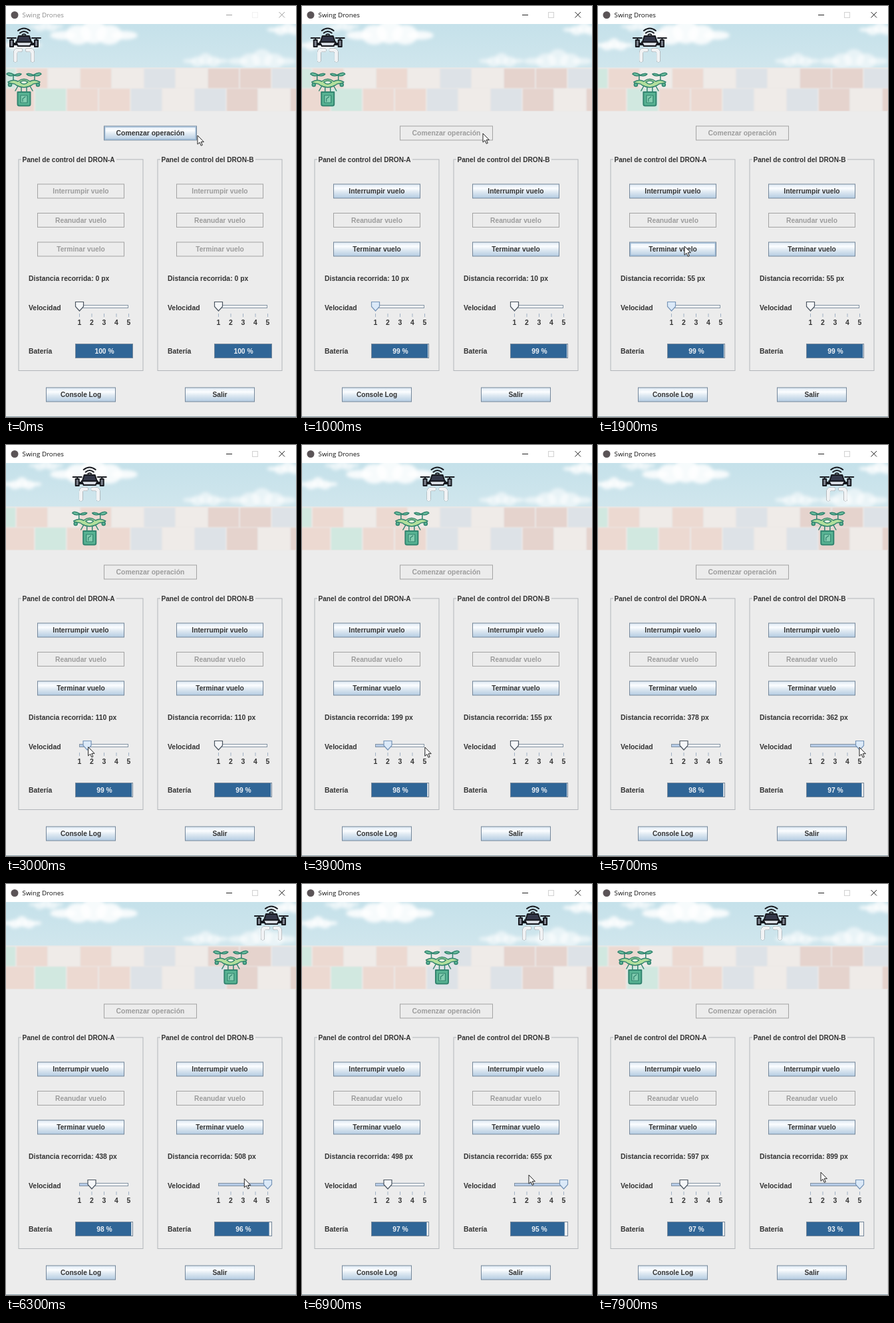
An HTML page for the animation above (8000 ms loop, 436 by 616 pixels).

```html
<!DOCTYPE html>
<html lang="es">
<head>
<meta charset="utf-8">
<title>Swing Drones</title>
<style>
  html, body { margin: 0; width: 100%; height: 100%; overflow: hidden; background: #ececec; }
  svg { display: block; width: 436px; height: 616px; }
  text { font-family: "Liberation Sans", Arial, sans-serif; font-weight: bold; font-size: 10.25px; fill: #333; white-space: pre; }
  .mid { text-anchor: middle; }
  .title { font-family: "Open Sans", "Noto Sans", sans-serif; font-weight: 400; font-size: 9.8px; }
  .face { fill: url(#metal); stroke: #75879a; }
  .glow { fill: none; stroke: #9dbad5; stroke-width: 1.4; visibility: hidden; }
  .hover .glow { visibility: visible; }
  .down .face { fill: #a3b8cc; }
  .off text { fill: #9c9c9c; }
  .off .face { fill: #ececec; stroke: #a3a3a3; }
</style>
</head>
<body>
<svg viewBox="0 0 436 616" xmlns="http://www.w3.org/2000/svg">
  <defs>
    <linearGradient id="metal" x2="0" y2="1">
      <stop offset="0" stop-color="#dde8f3"/><stop offset=".3" stop-color="#fbfdff"/>
      <stop offset=".55" stop-color="#dfe9f2"/><stop offset="1" stop-color="#b4cce2"/>
    </linearGradient>
    <linearGradient id="air" x2="0" y2="1">
      <stop offset="0" stop-color="#c5e1ea"/><stop offset="1" stop-color="#d0e6ed"/>
    </linearGradient>
    <filter id="soft" x="-20%" y="-20%" width="140%" height="140%"><feGaussianBlur stdDeviation="2.5"/></filter>
    <filter id="faint"><feGaussianBlur stdDeviation="1"/></filter>
    <clipPath id="skyBox"><rect y="27" width="436" height="65.5"/></clipPath>
    <clipPath id="yardBox"><rect y="92.5" width="436" height="65"/></clipPath>

    <g id="droneA" fill="none" stroke="#17191f" stroke-width="2" stroke-linecap="round" stroke-linejoin="round">
      <path d="M-9 37Q0 30 9 37M-6 40.5Q0 35.5 6 40.5M-2.500 43Q0 41.300 2.500 43"/>
      <path d="M-25 48H-12M12 48H25M-18.500 48V51M18.500 48V51"/>
      <path d="M-18 57H18" stroke-width="4"/>
      <path d="M-21 51H-16V61H-21ZM16 51H21V61H16Z" fill="#7f8490"/>
      <path d="M-8 45H8L11 54H-11Z" fill="#343849"/>
      <path d="M-12 54H12L9 60H-9Z" fill="#d6dbe2"/>
      <path id="legs" d="M-5 66H-9Q-13 66 -13 71V81.500M5 66H9Q13 66 13 71V81.500" stroke-width="5.500"/>
      <use href="#legs" stroke="#f1f3f5" style="stroke-width:2"/>
      <path d="M-5 66H-9Q-13 66 -13 71V81.500M5 66H9Q13 66 13 71V81.500" stroke="#f1f3f5" stroke-width="2"/>
    </g>

    <g id="droneB" fill="none" stroke="#32846f" stroke-width="1.500" stroke-linecap="round" stroke-linejoin="round">
      <path d="M-15 103Q-24 98 -26 102Q-22 106 -15 104Q-8 100 -4 102Q-7 106 -15 104ZM15 103Q24 98 26 102Q22 106 15 104Q8 100 4 102Q7 106 15 104Z" fill="#70c3a2"/>
      <path d="M-16 104V111M16 104V111"/>
      <path d="M-24 114Q-16 109 -9 113Q0 106 9 113Q16 109 24 114L21 117Q15 115 11 119Q0 125 -11 119Q-15 115 -21 117Z" fill="#b2df9c"/>
      <path d="M-6 114Q0 110 6 114Q0 120 -6 114Z" fill="#edf7e1"/>
      <circle cx="-21" cy="118" r="2.500" fill="#5fb798"/><circle cx="21" cy="118" r="2.500" fill="#5fb798"/>
      <path d="M-9 120L-13 127M9 120L13 127M-4 122V128M4 122V128"/>
      <path d="M-9.500 129H9.500V147Q9.500 149.500 7 149.500H-7Q-9.500 149.500 -9.500 147Z" fill="#58b393" stroke-width="2"/>
      <path d="M-5 134H5V145H-5ZM-2 143V139L2 136" fill="#83cdb0" stroke-width="1.200"/>
    </g>
  </defs>

  <rect width="436" height="616" fill="#ececec"/>
  <rect width="436" height="27" fill="#fff"/>
  <circle cx="13" cy="13.500" r="5.500" fill="#5b5457"/>
  <text id="title" class="title" x="24.500" y="17.300">Swing Drones</text>
  <path id="marks" d="M331 13.500H340M410.500 9L419 17.500M419 9L410.500 17.500"/>
  <rect id="grow" x="370.500" y="9.500" width="8" height="8" fill="none"/>

  <g clip-path="url(#skyBox)">
    <rect y="27" width="436" height="66" fill="url(#air)"/>
    <g id="clouds" filter="url(#soft)" fill="#fff"></g>
  </g>
  <g clip-path="url(#yardBox)">
    <rect y="92" width="436" height="66" fill="#ebe8e6"/>
    <g id="boxes" filter="url(#faint)"></g>
  </g>
  <use id="flyA" href="#droneA"/>
  <use id="flyB" href="#droneB"/>
  <g id="ui"></g>
  <path d="M0 615.500H436" stroke="#8fa3ad"/>
  <path d="M435.500 158V615" stroke="#dcdcdc"/>
  <path id="cursor" d="M0 0V13.200L3.100 10.400L5.200 15.300L7.300 14.400L5.200 9.700H9.400Z" fill="#fff" stroke="#222" stroke-linejoin="round"/>
</svg>
<script>
const LOOP = 8000, STEP = 100, PRESS = 700, START = 800;
const SPAN = 378, NOTCH = 18.5;
const $ = id => document.getElementById(id);
const ui = $('ui'), buttons = [];

function add(parent, tag, attrs, text) {
  const el = document.createElementNS('http://www.w3.org/2000/svg', tag);
  set(el, attrs);
  if (text) el.textContent = text;
  return parent.appendChild(el);
}
function set(el, attrs) {
  for (const k in attrs) el.setAttribute(k, attrs[k]);
}
const ramp = (t, from, to) => Math.min(1, Math.max(0, (t - from) / (to - from)));

// A cloud is a row of puffs, tallest in the middle
function cloud(x, y, w, opacity) {
  for (let i = -2; i <= 2; i++) {
    const bulge = Math.cos(i * .6);
    add($('clouds'), 'ellipse', { cx: x + i * w / 5, cy: y - bulge * w / 14 + (i & 1) * 3, rx: w / 6, ry: w / 6.5 * bulge, opacity });
  }
}
cloud(24, 60, 52, .8);
cloud(60, 32, 46, .6);
cloud(132, 47, 116, .85);
cloud(300, 84, 60, .55);
cloud(385, 85, 90, .55);
cloud(424, 37, 56, .75);

// Containers: one letter of the palette per stack
const tints = { p: '#ecd9d1', m: '#d1e8e0', w: '#efebe8', b: '#dde2e7', r: '#e5d3cd' };
['mpwpwbwrrb', 'pmppbwbrwr'].forEach((row, j) => [...row].forEach((c, i) =>
  add($('boxes'), 'rect', { x: i * 48 - 32 * (1 - j) - 4 * j, y: 94 + j * 30, width: 46, height: 29 + 5 * j, fill: tints[c] })));

const label = (x, y, text, size = 10.25, cls = '') =>
  add(ui, 'text', { x, y, class: cls, style: `font-size:${size}px` }, text);

function button(x, y, width, text, isOn, size = 10.25) {
  const g = add(ui, 'g');
  add(g, 'rect', { class: 'face', x, y, width, height: 21 });
  add(g, 'rect', { class: 'glow', x: x + 1.2, y: y + 1.2, width: width - 2.4, height: 18.6 });
  add(g, 'text', { class: 'mid', x: x + width / 2, y: y + 14, style: `font-size:${size}px` }, text);
  buttons.push({ g, x, y, width, isOn });
}

const always = () => true, never = () => false;
const idle = t => t < START, flying = t => t >= START;

function panel(name, x) {
  add(ui, 'rect', { x: x + 19, y: 230, width: 187, height: 316.5, fill: 'none', stroke: '#b1b5b9' });
  add(ui, 'rect', { x: x + 23, y: 226, width: 143, height: 9, fill: '#ececec' });
  label(x + 24.5, 234, 'Panel de control del DRON-' + name, 10.1);
  ['Interrumpir', 'Reanudar', 'Terminar'].forEach((verb, i) =>
    button(x + 47.5, 267 + i * 43.5, 130, verb + ' vuelo', i === 1 ? never : flying));
  const dist = label(x + 34, 412, '', 10.4);
  label(x + 34, 455.5, 'Velocidad', 10.4);
  add(ui, 'rect', { x: x + 110.5, y: 448.5, width: 73, height: 4, fill: '#f6f6f6', stroke: '#8494a4' });
  const fill = add(ui, 'rect', { x: x + 111, y: 449, height: 3, fill: '#b5cae6' });
  for (let i = 0; i < 5; i++) {
    const tx = x + 110.5 + i * NOTCH;
    add(ui, 'path', { d: `M${tx} 461V466`, stroke: '#9fb0c4' });
    label(tx, 478, String(i + 1), 10.4, 'mid');
  }
  const knob = add(ui, 'path', { d: 'M-6 443.5H6V450.5L0 457L-6 450.5Z', 'stroke-width': 1.2 });
  label(x + 34, 521, 'Batería', 10.4);
  add(ui, 'rect', { x: x + 104.5, y: 506.5, width: 86, height: 21, fill: '#f1f1f1', stroke: '#75879a' });
  const bar = add(ui, 'rect', { x: x + 105, y: 507, height: 20, fill: '#306697' });
  const charge = label(x + 148, 521, '', 10.25, 'mid');
  charge.style.fill = '#eef2f6';
  return { x, dist, fill, knob, bar, charge, icon: $('fly' + name) };
}

button(147.5, 180, 139, 'Comenzar operación', idle, 10.4);
const drones = [
  { ...panel('A', 0), drag: [2750, 3150], top: 2, focus: t => t >= START && t < 4750 },
  { ...panel('B', 209), drag: [4750, 5350], top: 5, focus: t => t >= 4750 }
];
button(60.5, 572, 104, 'Console Log', always, 10.1);
button(269.5, 572, 104, 'Salir', always);

const speed = (d, t) => 1 + (d.top - 1) * ramp(t, ...d.drag);

// Add up distance and battery use, tick by tick
function flight(d, t) {
  let far = 0, used = 0;
  for (let s = START; s < t; s += STEP) {
    const extra = Math.round(speed(d, s)) - 1, dt = STEP / 1000;
    far += 50 * (1 + extra) * (1 - .006 * extra) * dt;
    used += (.3 + .094 * extra * extra) * dt;
  }
  return { far, level: 100 - Math.ceil(used) };
}

// Drones bounce between the walls
function place(far) {
  const u = far ? (3 + .87 * far) % (2 * SPAN) : 0;
  return 27 + Math.min(u, 2 * SPAN - u);
}

// Pointer moves: start, end, x, y
const moves = [[100, 400, 272, 191], [1000, 1700, 130, 360], [2000, 2600, 113, 452], [2750, 3150, 130, 453],
  [3700, 4400, 322, 453], [4750, 5350, 393, 453], [5900, 6500, 341, 436], [6900, 7900, 335, 432]];

function pointer(t) {
  let x = 288, y = 194;
  for (const [from, to, tx, ty] of moves) {
    const k = ramp(t, from, to);
    x += (tx - x) * k;
    y += (ty - y) * k;
  }
  return [x, y];
}

function draw(t) {
  const [mx, my] = pointer(t), active = t >= PRESS;
  set($('cursor'), { transform: `translate(${mx} ${my})` });
  $('title').style.fill = active ? '#111' : '#8b8b8b';
  set($('marks'), { stroke: active ? '#222' : '#a0a0a0' });
  set($('grow'), { stroke: active ? '#d2d2d2' : '#f2f2f2' });

  for (const b of buttons) {
    const on = b.isOn(t);
    const over = on && mx >= b.x && mx <= b.x + b.width + 2 && my >= b.y && my <= b.y + 21;
    set(b.g, { class: `${on ? '' : 'off'} ${over ? 'hover' : ''} ${over && t === PRESS ? 'down' : ''}` });
  }

  for (const d of drones) {
    const { far, level } = flight(d, t), slide = (speed(d, t) - 1) * NOTCH, focus = d.focus(t);
    set(d.icon, { transform: `translate(${place(far)} 0)` });
    d.dist.textContent = `Distancia recorrida: ${Math.round(far)} px`;
    d.charge.textContent = level + ' %';
    set(d.bar, { width: 85 * level / 100 });
    set(d.fill, { width: slide });
    set(d.knob, {
      transform: `translate(${d.x + 110.5 + slide} 0)`,
      fill: focus ? '#dbe9f8' : '#f5f7f9',
      stroke: focus ? '#7795b8' : '#4b5560'
    });
  }
}

const begin = performance.now();
function tick() {
  const t = (performance.now() - begin) % LOOP;
  draw(Math.floor(t / STEP) * STEP);
  requestAnimationFrame(tick);
}
tick();
</script>
</body>
</html>
```
